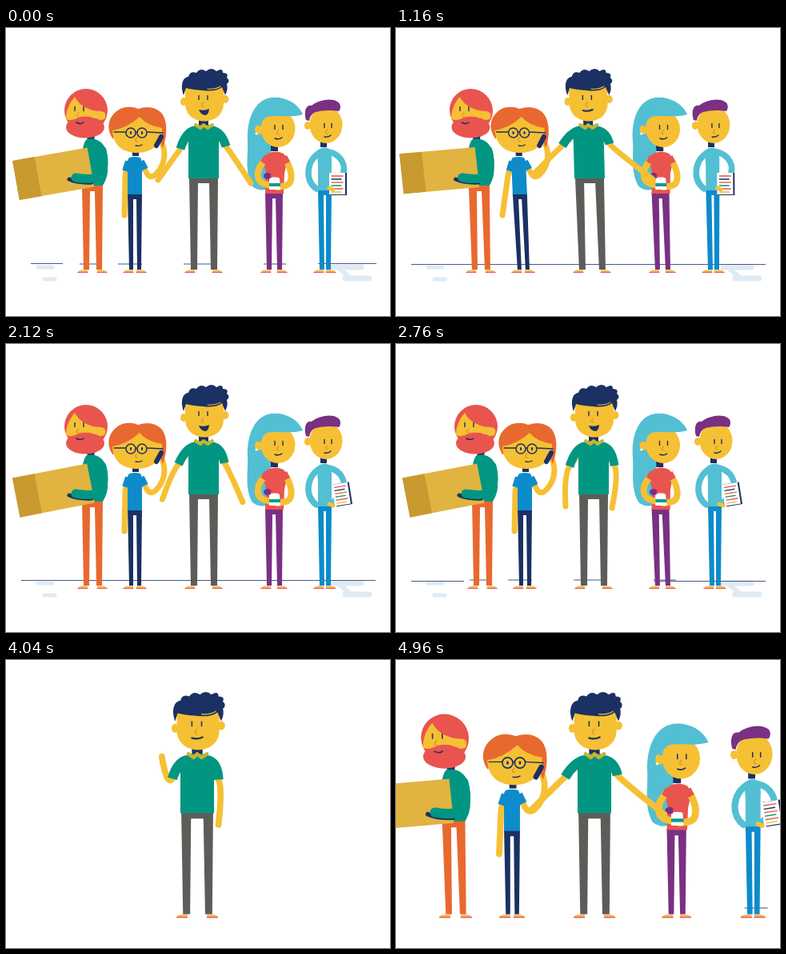
An HTML page with a canvas that plays this animation: 480 by 360 pixels, repeating every 5000 ms.

```html
<!DOCTYPE html>
<html>
<head>
<meta charset="utf-8">
<style>
html, body { margin: 0; width: 100%; height: 100%; overflow: hidden; background: #fff; }
canvas { display: block; }
</style>
</head>
<body>
<canvas id="stage" width="480" height="360"></canvas>
<script>
const c = document.getElementById('stage').getContext('2d');
const LOOP = 5000, GROUND = 304;
const SKIN = '#f6c034', NAVY = '#1b3163', GREEN = '#009682', RED = '#e9544f', ORANGE = '#e8692f',
  CYAN = '#53bfd3', BLUE = '#0d8bcb', PURPLE = '#7a3083', GREY = '#5e5c59', SHADE = '#dfeaf4';

// Drawing helpers
function fill(color, d) {
  c.fillStyle = color;
  c.fill(new Path2D(d));
}
function line(color, width, d, cap = 'round') {
  c.strokeStyle = color;
  c.lineWidth = width;
  c.lineCap = cap;
  c.lineJoin = 'round';
  c.stroke(new Path2D(d));
}
function oval(color, x, y, rx, ry = rx) {
  c.fillStyle = color;
  c.beginPath();
  c.ellipse(x, y, rx, ry, 0, 0, 7);
  c.fill();
}
function turned(x, y, degrees, draw) {
  c.save();
  c.translate(x, y);
  c.rotate(degrees * Math.PI / 180);
  draw();
  c.restore();
}
function eyes(x1, x2, y) {
  line(NAVY, 1.4, `M${x1} ${y - 2.5}v5M${x2} ${y - 2.5}v5`);
}
function nose(x, y) {
  line('#d99a26', 1.3, `M${x} ${y - 3}q-5 4 0 5`);
}
function legs(color, l, r, top, thigh, ankle) {
  for (const d of [`M${l - 6} 306q2-4 8-3.5h5v3.5z`, `M${r + 6} 306q-2-4-8-3.5h-5v3.5z`]) fill('#f3b55a', d);
  line(RED, 1, `M${l - 5} 305.5h12M${r - 7} 305.5h12`);
  fill(color, `M${l} ${top}H${r}L${r - 1} 302h${-ankle}L${r - thigh} ${top + 8}H${l + thigh}L${l + 2 + ankle} 302h${-ankle}Z`);
}

// Timing helpers
const clamp = v => Math.max(0, Math.min(1, v));
const easeOut = p => 1 - (1 - clamp(p)) ** 3;
function key(t, ...keys) {
  let i = keys.length - 1;
  while (i > 0 && keys[i][0] > t) i--;
  const [t0, a] = keys[i], [t1, b] = keys[i + 1] || [t0 + 1, a];
  const p = clamp((t - t0) / (t1 - t0)), s = p * p * (3 - 2 * p);
  return Array.isArray(a) ? a.map((v, n) => v + (b[n] - v) * s) : a + (b - a) * s;
}

// Sleeve end and hand of the left arm, then of the right arm
const ARMS = {
  down: [217, 153, 212, 203, 273, 152, 270, 205],
  part: [218, 151, 190, 190, 275, 148, 306, 194],
  hold: [214, 147, 176, 184, 273, 145, 326, 189],
  hips: [209, 149, 229, 181, 286, 149, 263, 181],
  wave: [219, 149, 207, 124, 271, 150, 271, 201]
};

function arm(sx, sy, side, ex, ey, hx, hy) {
  const reach = .4;
  const elbow = `${ex + (ex - sx) * reach} ${ey + (ey - sy) * reach}`;
  line(SKIN, 7, `M${sx} ${sy}L${ex} ${ey}Q${elbow} ${hx} ${hy}`);
  line(GREEN, 11, `M${sx} ${sy}Q${sx + side * 11} ${sy + 3} ${ex} ${ey}`, 'butt');
}

function bearded(t) {
  legs(ORANGE, 95, 121, 196, 10, 7);
  fill(NAVY, 'M101 134h10l-1 7h-8z');
  fill(GREEN, 'M101 139C116 136 127 146 127 165V180C126 189 122 195 121 197H95V175C94 158 96 143 101 139Z');
  const tilt = key(t, [0, -10], [520, -5], [1660, -5], [2120, -11], [2800, -11], [3360, -5]);
  turned(106, 174, tilt, () => {
    fill('#e1b341', 'M-95-25H0V25H-95Z');
    fill('#c89a2f', 'M-95-25H-67V25H-95Z');
  });
  line(NAVY, 5, 'M79 189Q90 194 107 193');
  line(GREEN, 11, 'M120 153C124 170 122 183 115 187Q104 190 87 187');
  oval(RED, 100, 103, 27);
  fill(SKIN, 'M86 86C79 94 75 103 75 114Q98 121 123 114Q127 105 119 104C106 104 92 98 86 86Z');
  oval(RED, 99, 124, 24, 13.5);
  fill(SKIN, 'M76 109Q78 117 86 114Q100 107 111 113L118 109L84 99Z');
  eyes(86, 97, 101);
  nose(91, 109);
  line(NAVY, 1.5, 'M88 118q5 3 9 0');
}

function kid(t, lean) {
  legs(NAVY, 152, 170, 206, 7, 5);
  line(SKIN, 7, `M151 172L${149 - 2 * lean} 185L${148 - 10 * lean} 234`);
  line(SKIN, 7, 'M173 175Q178 190 186 184C197 174 202 158 194 142');
  line(BLUE, 10, 'M154 167L150 179M168 167L173 177', 'butt');
  fill(BLUE, 'M154 162Q162 160 168 162Q171 166 170 180V208H152V180Q150 166 154 162Z');
  fill(NAVY, 'M158 153h8v7h-8z');
  fill(ORANGE, 'M134 139C123 124 129 107 145 100Q157 97 165 101Q184 95 195 107C203 118 201 137 196 150L188 130H136Z');
  fill(SKIN, 'M133 128Q152 125 167 111Q176 122 195 125C197 144 183 156 164 156C146 156 134 147 133 128Z');
  line(NAVY, 1.3, 'M135 130H150M162 130H164M176 130L196 131');
  line(NAVY, 1.5, 'M150 131a6 6 0 1 0 12 0a6 6 0 1 0-12 0M164 131a6 6 0 1 0 12 0a6 6 0 1 0-12 0');
  oval(NAVY, 156, 131, 1.2, 2);
  oval(NAVY, 170, 131, 1.2, 2);
  nose(164, 140);
  line(NAVY, 1.3, 'M162 147q5 1 8-1');
  line(NAVY, 6, 'M194 136L188 147');
}

function hero(t) {
  const { down, part, hold, hips, wave } = ARMS;
  const pose = key(t, [0, part], [520, hold], [1700, hold], [2500, down],
    [2900, down], [3280, hips], [3600, hips], [3900, wave], [4400, wave], [4800, hold]);
  if (t > 3900 && t < 4400) pose[2] += 4 * Math.sin((t - 4040) / 250 * Math.PI);
  legs(GREY, 229, 265, 186, 11, 8);
  arm(235, 128, -1, ...pose.slice(0, 4));
  arm(259, 128, 1, ...pose.slice(4));
  fill(GREEN, 'M233 123Q247 118 261 123Q267 127 266 140V188H228V140Q227 127 233 123Z');
  fill(NAVY, 'M241 114h12v7h-12z');
  line('#c9b42f', 4, 'M237 121L243 125L247 121L252 125L258 121');
  oval(SKIN, 222, 92, 4, 5);
  oval(SKIN, 274, 89, 4.5, 5);
  fill(SKIN, 'M224 74V94C224 124 272 124 272 94V72Z');
  fill(NAVY, 'M222 84C217 70 222 61 228 61Q230 53 238 56Q243 49 250 54Q257 48 263 54Q271 49 271 56Q279 56 276 62Q281 66 276 70Q278 76 274 84L270 74Q262 80 246 78Q232 77 225 75Z');
  line(SKIN, 1, 'M252 76Q262 77 268 73');
  eyes(241, 252, 87);
  nose(247, 96);
  if (t < 700 || t > 1900 && t < 3000) fill(NAVY, 'M241 102Q248 104 254 101Q253 109 249 109Q243 108 241 102Z');
  else line(NAVY, 2, 'M241 103Q247 105 253 102');
}

function girl() {
  legs(PURPLE, 324, 346, 205, 9, 6);
  fill(CYAN, 'M371 108C363 90 342 84 327 88C310 93 301 115 302 140C303 160 298 180 308 198Q318 206 331 200V110Z');
  fill(RED, 'M327 157Q337 152 347 157L352 164L348 182L347 207H324L325 180L321 164Z');
  fill(NAVY, 'M331 146h9v8h-9z');
  oval(SKIN, 340, 126, 21.5, 23);
  oval(SKIN, 316, 127, 5, 6);
  oval('#fff', 313, 132, 1.5);
  fill(CYAN, 'M315 122C315 106 322 92 338 91C352 90 365 97 371 108C354 113 338 108 327 111Q319 114 319 123Z');
  eyes(336, 346, 124);
  nose(341, 131);
  line(NAVY, 1.4, 'M336 138q5 2 9-1');
  line(SKIN, 8, 'M322 167C312 178 313 190 321 194L330 197M351 167C360 184 357 195 350 197L339 199');
  line(RED, 9, 'M327 161L322 169M347 161L351 169', 'butt');
  fill('#fff', 'M329 188Q336 183 342 188L343 202H329Z');
  fill('#159a8d', 'M329 194h14v4h-14z');
  oval(PURPLE, 327, 185, 5, 4);
  line(RED, 3, 'M332 185h7');
}

function clerk(t) {
  legs(BLUE, 390, 407, 201, 7, 6);
  line(CYAN, 7.5, 'M393 155C375 166 373 190 388 201M404 155C418 158 427 172 420 185L409 198');
  fill(CYAN, 'M392 151Q398 148 404 151Q408 156 407 170V203H390V170Q388 156 392 151Z');
  fill(NAVY, 'M393 142h8v7h-8z');
  oval(SKIN, 377, 122, 4, 5);
  oval(SKIN, 400, 121, 20.5, 23);
  fill(PURPLE, 'M375 115C372 104 375 95 382 97C391 90 406 87 414 92C419 94 419 101 416 104C404 102 396 103 387 105Q380 108 379 116Z');
  eyes(398, 407, 122);
  nose(402, 130);
  line(NAVY, 1.4, 'M398 136q5 1 8-2');
  const flat = [0, 415, 195], raised = [-9, 420, 188];
  const [tilt, x, y] = key(t, [0, flat], [1660, flat], [2120, raised]);
  turned(x, y, tilt, () => {
    fill(NAVY, 'M-9-14H11V14H-9Z');
    fill('#fff', 'M-11-14H9V13H-11Z');
    [RED, NAVY, ORANGE, GREEN, RED, SKIN].forEach((color, i) =>
      line(color, 1.3, `M-8 ${-10 + i * 4}h${i % 2 ? 12 : 14}`));
  });
  line(SKIN, 5, 'M404 200L409 202');
}

function floor(t) {
  line(SHADE, 5, 'M40 299H58M48 314H61');
  line(SHADE, 7, 'M409 299H444M424 313H454');
  line(SHADE, 6, 'M416 300L430 312');
  const full = t > 300 && t < 2500;
  const segments = full ? 'M19 295.5H462'
    : (t < 300 ? 'M31 294.5H71M390 294.5H463' : 'M19 296.5H85M323 296.5H462') +
      'M92 295H118M140 295H170M222 295H256M322 295H350';
  line(NAVY, .8, segments, 'butt');
}

// Places a figure by its feet, leaning sideways by shear
function place(draw, t, pivot, x, y, scale, shear, lean) {
  c.save();
  c.translate(x, y);
  c.scale(scale, scale);
  c.transform(1, 0, -shear, 1, 0, 0);
  c.translate(-pivot, -GROUND);
  draw(t, lean);
  c.restore();
}

function crowd(t) {
  const lean = key(t, [0, 0], [520, 1], [1660, 1], [2120, 0]);
  const girlLean = key(t, [0, 0], [520, 1], [1660, 1], [2120, 0], [2700, 1]);
  const slide = -60 * Math.max(0, (t - 3080) / 280) ** 3;
  c.save();
  c.translate(slide, 0);
  floor(t);
  c.restore();
  const stand = (draw, pivot, shear, amount) =>
    place(draw, t, pivot, pivot + slide - 2 * amount, GROUND, 1, shear * amount, amount);
  stand(bearded, 109, -.02, lean);
  stand(kid, 161, -.043, lean);
  stand(girl, 338, -.025, girlLean);
  stand(clerk, 404, -.006, lean);
  stand(hero, 247, -.026, lean);
}

function reunion(t) {
  const inner = 240 * (1 - easeOut((t - 4360) / 440));
  const outer = 1 - easeOut((t - 4360) / 940);
  const stand = (draw, pivot, x, shear = 0, lean = 0) =>
    place(draw, t, pivot, x, 320, 1.107, shear, lean);
  if (t > 4360) {
    stand(bearded, 109, 99 - 500 * outer, -.02);
    stand(kid, 161, 145 - inner, 0, .15);
    stand(girl, 338, 354 + inner);
    const clerkX = 420 + 690 * outer;
    stand(() => line(NAVY, .8, 'M389 295H415M430 295H463', 'butt'), 404, clerkX);
    stand(clerk, 404, clerkX);
  }
  const enter = 320 * (1 - easeOut((t - 3520) / 300));
  stand(hero, 247, key(t, [4300, 239], [4750, 248]) + enter);
}

function frame(now) {
  const t = now % LOOP;
  c.fillStyle = '#fff';
  c.fillRect(0, 0, 480, 360);
  if (t < 3700) crowd(t);
  if (t > 3520) reunion(t);
  requestAnimationFrame(frame);
}
requestAnimationFrame(frame);
</script>
</body>
</html>
```
